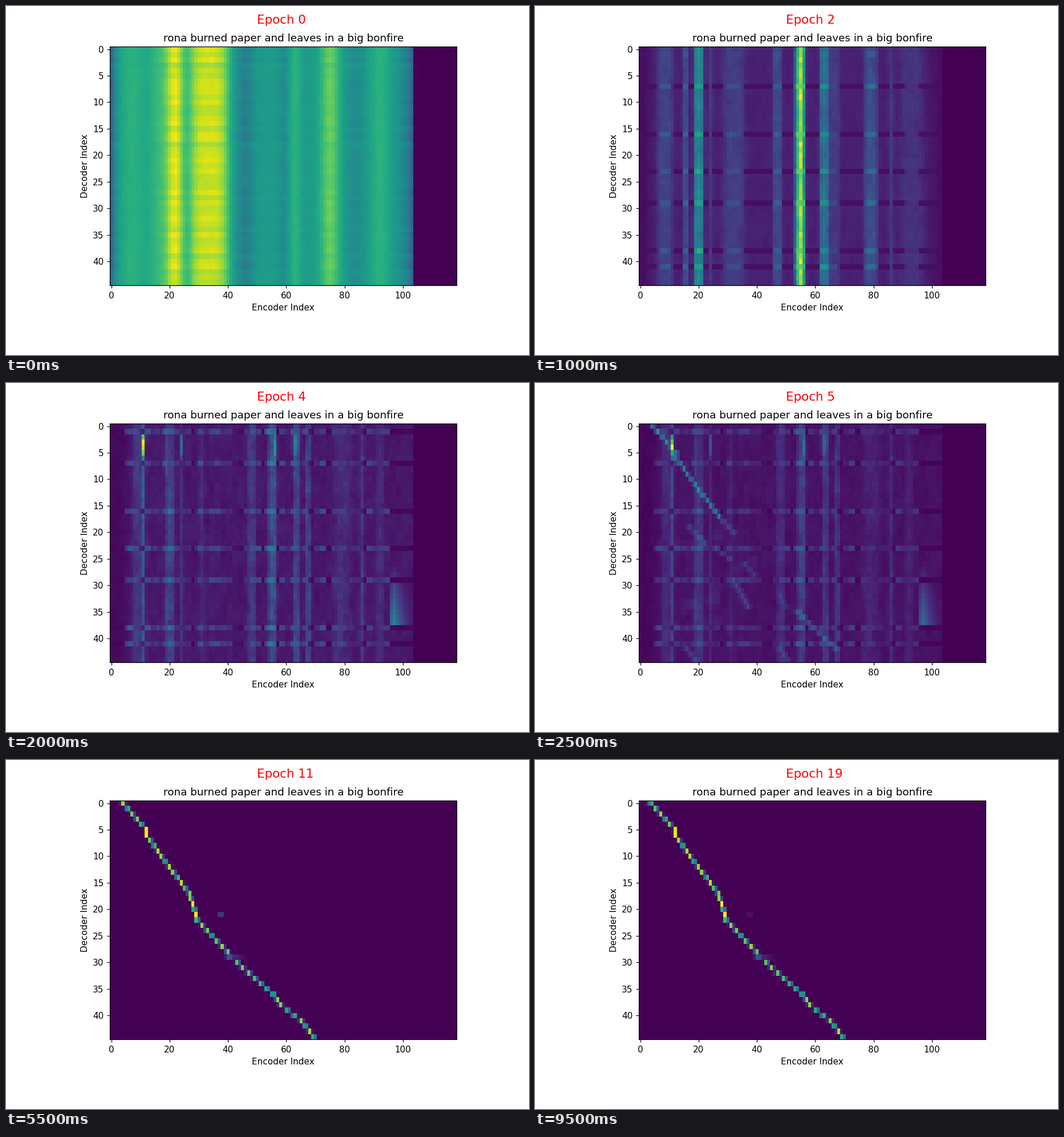
Animation of 917x611 px, one loop 10 s. Source, as a matplotlib script:

```python
import numpy as np
import matplotlib.pyplot as plt
from matplotlib.animation import FuncAnimation

WIDTH, HEIGHT, DPI = 917, 611, 110
LEFT, RIGHT, BOTTOM, TOP = 182.2, 790.3, 122.2, 540.1
ROWS, COLS, VALID = 45, 119, 104
EPOCHS, INTERVAL = 20, 500
GAPS = [7, 16, 23, 29, 38, 41]  # decoder steps between words

rng = np.random.default_rng(4)
rows, cols = np.arange(ROWS), np.arange(COLS)


def bump(x, center, width, height, power=2):
    return height * np.exp(-np.abs((x - center) / width) ** power)


def stripes(base, *bumps):
    """Column profile from (center, width, height) blocks with steep sides."""
    return base + sum(bump(cols, *b, power=4) for b in bumps)


def texture(amount):
    """Gain per cell: slow drift down the rows plus fine grain."""
    drift = rng.uniform(-1, 1, (ROWS, COLS // 2 + 1)).repeat(2, axis=1)[:, :COLS]
    drift = (drift + np.roll(drift, 1, 0) + np.roll(drift, 2, 0)) / 2
    return 1 + amount * (drift + .5 * rng.uniform(-1, 1, (ROWS, COLS)))


def kernel(center, sigma):
    weights = np.exp(-((cols - center) / sigma) ** 2 / 2)
    return weights / weights.sum()


def add_line(grid, r0, c0, r1, c1, amp, sigma=.7):
    for row in range(r0, r1 + 1):
        center = np.interp(row, [r0, r1], [c0, c1])
        grid[row] = np.maximum(grid[row], amp * kernel(center, sigma))


def finish(grid):
    grid[:, VALID:] = 0
    return grid / grid.max()


def untrained():
    profile = .52 + bump(cols, 33.5, 6.7, .35, 4) + sum(bump(cols, *b) for b in [
        (7, 5, .09), (17, 4, .12), (22, 3, .36), (46, 3, -.1), (59, 2, -.05),
        (63, 2, .09), (75, 3.5, .21), (84, 5, -.05), (92, 4, .1)])
    profile -= .22 * np.exp(-cols / 1.5) + .2 * np.exp((cols - VALID + 1) / 3)
    gain = rng.uniform(-.2, .14, ROWS)
    gain[GAPS] = .1
    grid = .58 + (profile - .58) * (1 + gain[:, None])
    return finish(np.clip(grid * texture(.012), 0, .97))


LETTERS = stripes(
    .09, (8.5, 2.8, .11), (15.5, 1.2, .13), (20, 1.6, .38), (24, 1, .07), (32, 4, .09),
    (47, 1.6, .13), (54.8, 1.7, .6), (63, 1.6, .27), (66.5, 2, .08), (79, 2.3, .15),
    (86, 1, .07), (93, 4, .06))
SPACES = .04 + np.sqrt(np.maximum(LETTERS - .14, 0))


def striped():
    fade = np.clip((VALID + 4 - cols) / 12, 0, 1) * np.clip((cols + 1) / 6, .4, 1)
    grid = LETTERS * fade * texture(.12)
    grid[:, 55] += .13 + .12 * rng.random(ROWS)
    grid[GAPS] = SPACES * texture(.06)[GAPS]
    grid[1] = np.maximum(grid[1], .8 * SPACES)
    return finish(grid)


def mottled():
    letters = stripes(
        .065, (9, 1.8, .09), (11, .8, .2), (20, 1.6, .14), (24, .8, .07), (31, 1, .05),
        (48, 1.5, .09), (55.3, 1.4, .17), (63.5, 1.1, .13), (67.5, .9, .13),
        (79, 3, .06), (86, .9, .11), (92, 1.2, .06))
    grid = letters * np.clip(cols / 7, .4, 1) * texture(.25)
    flare = stripes(0, (11, .7, .6), (24, .7, .22), (56, .7, .25), (63, .9, .25))
    grid += bump(rows, 3.7, 2.2, 1, 4)[:, None] * flare
    grid[3, 11] = 1
    tail = np.where(cols < 96, 0, np.exp(-np.abs(cols - 97) / 3.5))
    ramp = np.where(rows < 38, np.clip((rows - 24) / 13, 0, 1) * .45, .05)
    grid = np.maximum(grid, ramp[:, None] * tail)
    blocks = rng.uniform(0, .25, COLS // 2 + 1).repeat(2)[:COLS] * (cols > 4) * (cols < 96)
    marks = GAPS + [1]
    grid[marks] = np.maximum(.5 * SPACES, blocks) * texture(.25)[marks]
    return finish(grid)


KNOTS = [(0, 4), (5, 12), (6, 12), (11, 18.5), (15, 24), (17, 26.7), (19, 28),
         (22, 29.4), (25, 34.5), (31, 45), (36, 55.5), (38, 58), (41, 65), (44, 69.4)]
PATH = np.interp(rows, *np.transpose(KNOTS))


def emerging():
    grid = np.zeros((ROWS, COLS))
    for row in range(18):
        grid[row] = .95 * kernel(PATH[row] + .3, .48)
    for line in [(18, 28.5, 20, 32, .5), (19, 17, 22, 22, .5), (23, 26, 25, 30.6, .5),
                 (26, 36, 28, 39, .35), (29, 32, 34, 37, .5), (32, 48, 34, 50, .25),
                 (35, 54, 42, 67, .65), (42, 16, 44, 18.7, .45), (42, 48, 44, 50.5, .45)]:
        add_line(grid, *line)
    for row, col in zip(rng.uniform(20, 37, 14), rng.normal(25, 7, 14)):
        spot = bump(rows, row, 1.2, .08)[:, None] * bump(cols, col, 1.8, 1)
        grid += spot * (spot > .01)
    return finish(grid)


def aligned(lead, haze):
    """Attention along the path, sharper where the path advances slowly."""
    sigmas = .25 + .13 * np.gradient(PATH)
    centers = PATH - lead * np.exp(-rows / 5)
    grid = np.array([kernel(c, s) for c, s in zip(centers, sigmas)])
    grid[29] = .45 * kernel(40.3, .7) + .4 * kernel(42.5, 2)
    grid[21] += haze * kernel(37.5, .5)
    return finish(grid)


KEYS = {0: untrained(), 2: striped(), 4: mottled(), 7: emerging(),
        11: aligned(0, .3), 15: aligned(.4, .1), 19: aligned(.4, .1)}


def attention(epoch):
    before = max(k for k in KEYS if k <= epoch)
    after = min(k for k in KEYS if k >= epoch)
    t = (epoch - before) / max(after - before, 1)
    return finish((1 - t) * KEYS[before] + t * KEYS[after])


# The small margin keeps the pixel size from being truncated.
fig = plt.figure(figsize=((WIDTH + .01) / DPI, (HEIGHT + .01) / DPI), dpi=DPI,
                 facecolor="white")
ax = fig.add_axes([LEFT / WIDTH, BOTTOM / HEIGHT,
                   (RIGHT - LEFT) / WIDTH, (TOP - BOTTOM) / HEIGHT])
image = ax.imshow(KEYS[0], cmap="viridis", aspect="auto", interpolation="nearest",
                  vmin=0, vmax=1)
ax.set_title("rona burned paper and leaves in a big bonfire")
ax.set_xlabel("Encoder Index")
ax.set_ylabel("Decoder Index")
ax.set_xticks(range(0, 101, 20))
ax.set_yticks(range(0, 41, 5))
label = fig.text(.48, .95, "", fontsize=14, color="red")


def update(epoch):
    image.set_data(attention(epoch))
    label.set_text(f"Epoch {epoch}")
    return image, label


anim = FuncAnimation(fig, update, frames=EPOCHS, interval=INTERVAL, repeat=True,
                     repeat_delay=0)
plt.show()
```
